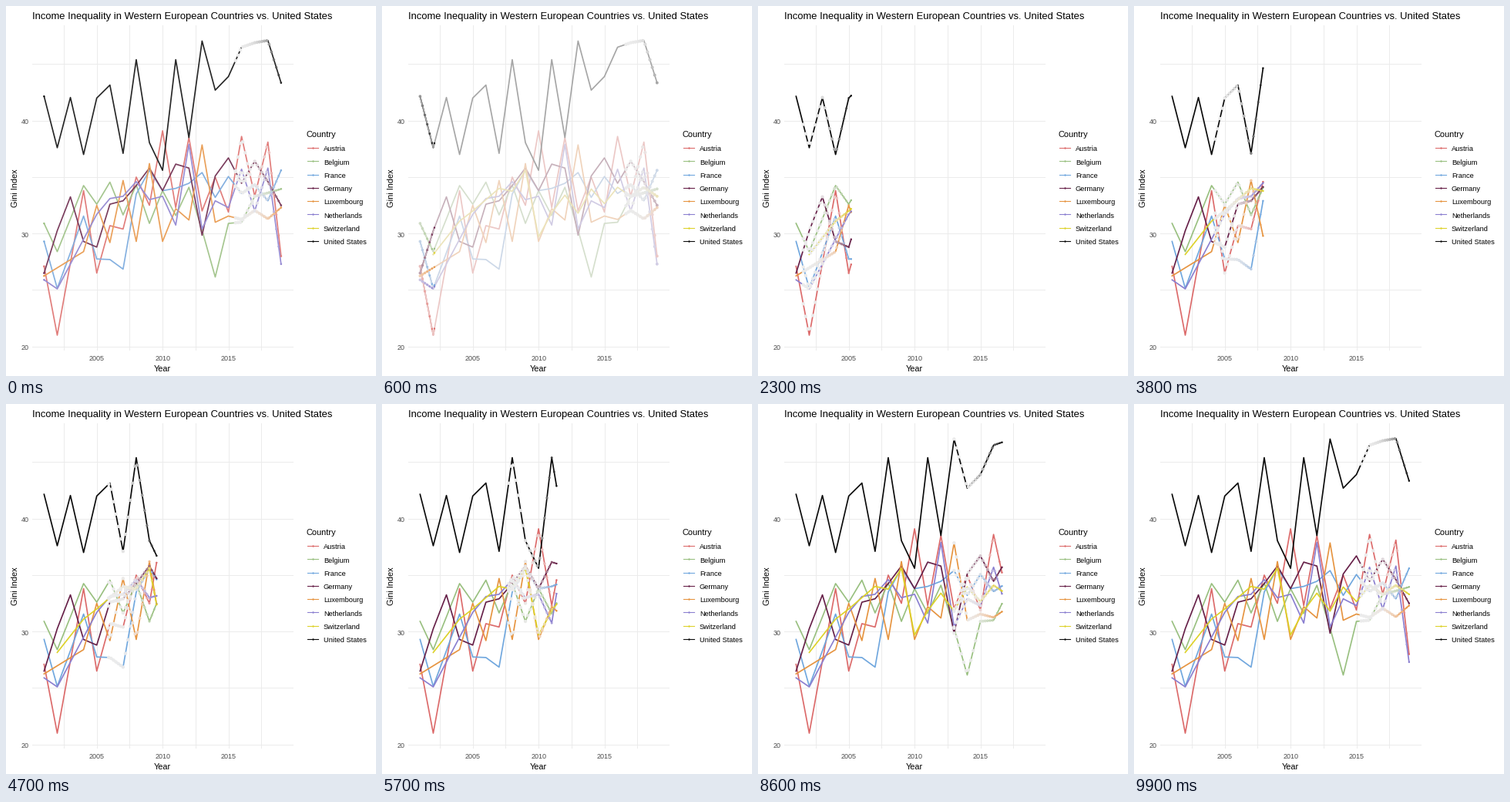
A matplotlib script that plays this animation: 480x480 px, repeating every 10000 ms.

```python
import matplotlib.pyplot as plt
import numpy as np
from matplotlib.animation import FuncAnimation
from matplotlib.colors import to_rgb

plt.rcParams["font.family"] = "Liberation Sans"

FRAMES, WAKE = 100, 20
GREY = "#EBEBEB"
YEARS = np.arange(2001, 2020)
GAP = np.nan  # no survey that year: the line runs straight across

SERIES = {
    "Austria": ("#DC6A6A", [
        27.1, 21.0, 27.4, 33.8, 26.5, 30.7, 30.4, 35.0, 32.5, 39.1,
        32.3, 38.5, 32.0, 35.0, 31.9, 38.6, 33.3, 38.1, 28.0]),
    "Belgium": ("#99C080", [
        30.9, 28.4, 31.3, 34.25, 32.6, 34.55, 31.65, 34.3, 30.9, 33.8,
        31.6, 34.1, 30.3, 26.15, 30.9, 31.0, 33.3, 33.6, 33.95]),
    "France": ("#70A7DE", [
        29.3, 25.15, 28.3, 31.55, 27.75, 27.7, 26.85, 33.5, 35.6, 33.8,
        34.0, 34.45, 35.4, 33.2, 35.05, 33.55, 34.3, 32.9, 35.6]),
    "Germany": ("#662048", [
        26.5, 30.25, 33.25, 29.3, 28.8, 32.6, 32.9, 34.25, 35.8, 33.8,
        36.15, 35.8, 29.85, 35.1, 36.7, 34.45, 36.4, 34.6, 32.5]),
    "Luxembourg": ("#E69440", [
        26.25, GAP, GAP, 28.4, 32.5, 29.2, 34.7, 29.3, 36.2, 29.3,
        32.2, 31.2, 37.85, 31.0, 31.55, 31.25, 32.05, 31.3, 32.3]),
    "Netherlands": ("#8A7FD0", [
        25.9, 25.1, GAP, GAP, 31.7, 33.1, 33.3, 34.6, 33.0, 33.3,
        30.75, 37.9, 30.4, 32.9, 32.3, 35.7, 32.0, 35.8, 27.3]),
    "Switzerland": ("#DDD22A", [
        GAP, 28.15, GAP, 31.1, 32.0, 33.0, 34.0, 33.75, 35.6, 29.7,
        31.85, 33.4, 31.8, 33.95, 32.65, 34.1, 33.3, 34.1, 33.3]),
    "United States": ("#0A0A0A", [
        42.15, 37.6, 42.05, 37.0, 42.0, 43.15, 37.1, 45.4, 38.05, 35.6,
        45.4, 38.5, 47.05, 42.7, 43.9, 46.5, 46.9, 47.1, 43.35]),
}

M = np.array([[0.4124, 0.3576, 0.1805],
              [0.2126, 0.7152, 0.0722],
              [0.0193, 0.1192, 0.9505]])
WHITE = M.sum(axis=1)


def to_lab(color):
    c = np.array(to_rgb(color))
    lin = np.where(c > 0.04045, ((c + 0.055) / 1.055) ** 2.4, c / 12.92)
    r = M @ lin / WHITE
    f = np.where(r > 0.008856, np.cbrt(r), 7.787 * r + 16 / 116)
    return np.array([116 * f[1] - 16, 500 * (f[0] - f[1]), 200 * (f[1] - f[2])])


def from_lab(lab):
    fy = (lab[0] + 16) / 116
    f = np.array([fy + lab[1] / 500, fy, fy - lab[2] / 200])
    r = np.where(f > 0.2069, f ** 3, (f - 16 / 116) / 7.787)
    lin = np.clip(np.linalg.solve(M, r * WHITE), 0, 1)
    return np.clip(np.where(lin > 0.0031308,
                            1.055 * lin ** (1 / 2.4) - 0.055, 12.92 * lin), 0, 1)


def fade(age):
    """Share of grey after `age` frames (cubic falloff)."""
    return 1 - (1 - age / WAKE) ** 3


def px(year):
    return 49.4 + 17.08 * (np.asarray(year) - 2001)


def py(gini):
    return 295.2 - 14.65 * (np.asarray(gini) - 30)


def when(frame):
    return 2001 + 18 * frame / (FRAMES - 1)


class Country:
    def __init__(self, ax, color, values):
        values = np.array(values)
        known = ~np.isnan(values)
        self.years, self.values = YEARS[known], values[known]
        lab, grey = to_lab(color), to_lab(GREY)
        self.shades = [from_lab(lab + (grey - lab) * fade(a))
                       for a in range(WAKE + 1)]
        self.line, = ax.plot([], [], color=color, lw=1.7, zorder=3,
                             solid_joinstyle="round")
        self.ghost, = ax.plot(px(self.years), py(self.values), lw=1.7,
                              zorder=4, solid_joinstyle="round")

    def at(self, t):
        return np.interp(t, self.years, self.values, left=np.nan)

    def draw(self, frame):
        t = when(frame)
        started = t >= self.years[0]
        past = self.years < t
        xs = np.append(self.years[past], t)
        ys = np.append(self.values[past], self.at(t))
        self.line.set_data(px(xs), py(ys))
        self.line.set_visible(started)
        age = frame + 1
        self.ghost.set_visible(bool(started and age <= WAKE))
        if age <= WAKE:
            self.ghost.set_color(self.shades[age])
        return started


fig = plt.figure(figsize=(480 / 72, 480 / 72), dpi=72, facecolor="white")
ax = fig.add_axes([0, 0, 1, 1])
ax.set(xlim=(0, 480), ylim=(480, 0))
ax.axis("off")


def label(x, y, s, size, color="black", **kw):
    kw = {"ha": "left", "va": "center_baseline", **kw}
    ax.text(x, y, s, fontsize=size, color=color, **kw)


# Grid and axis labels
for year in np.arange(2002.5, 2018, 2.5):
    ax.plot([px(year)] * 2, [25, 446], color=GREY, lw=1, zorder=1)
for gini in range(20, 50, 5):
    ax.plot([34, 372], [py(gini)] * 2, color=GREY, lw=1, zorder=1)
for year in (2005, 2010, 2015):
    label(px(year), 456, str(year), 9, "#4D4D4D", ha="center")
for gini in (20, 30, 40):
    label(29.5, py(gini) + 0.8, str(gini), 9, "#4D4D4D", ha="right")
label(33.5, 12.5, "Income Inequality in Western European Countries "
      "vs. United States", 13)
label(203, 469.5, "Year", 11, ha="center")
label(12, 236, "Gini Index", 11, ha="center", va="center", rotation=90)

# Legend
label(389, 165.5, "Country", 11)
for i, (name, (color, _)) in enumerate(SERIES.items()):
    y = 184 + 17.28 * i
    ax.plot([391, 404.5], [y, y], color=color, lw=1.1)
    ax.plot(397.5, y, "o", color=color, ms=2.4, mew=0)
    label(412, y + 0.8, name, 9.2)

countries = [Country(ax, color, values) for color, values in SERIES.values()]
dots = ax.scatter([], [], linewidths=0, zorder=5)


def update(frame):
    shown = [c for c in countries if c.draw(frame)]
    spots, sizes, colors = [], [], []
    for age in range(WAKE, -1, -1):
        t = when((frame - age) % FRAMES)
        for c in shown:
            if t >= c.years[0]:
                spots.append((px(t), py(c.at(t))))
                sizes.append((2.3 + 2.1 * fade(age)) ** 2)
                colors.append(c.shades[age])
    dots.set_offsets(spots)
    dots.set_sizes(sizes)
    dots.set_facecolors(colors)
    return [dots]


anim = FuncAnimation(fig, update, frames=FRAMES, interval=100,
                     repeat=True, repeat_delay=0, blit=False)
plt.show()
```
